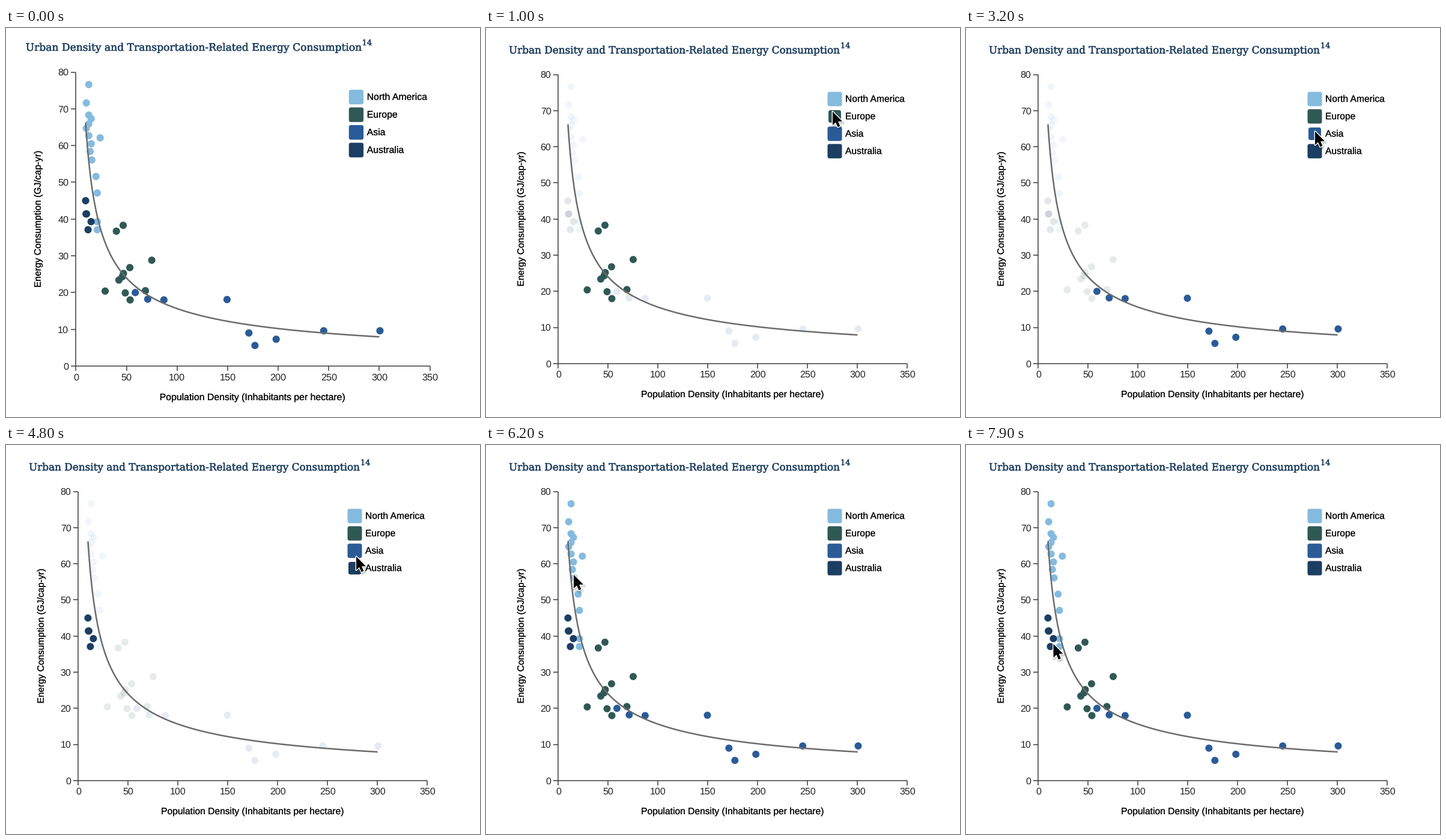
A matplotlib script that plays this animation: 789x649 px, repeating every 8000 ms.

```python
import matplotlib.pyplot as plt
import numpy as np
from matplotlib.animation import FuncAnimation
from matplotlib.patches import Circle, FancyBboxPatch, Polygon, Rectangle
from matplotlib.patheffects import withStroke

W, H, FRAMES = 789, 649, 80
NAVY, INK, AXIS = "#1f4060", "#0c0c0c", "#3a3a3a"
plt.rcParams["text.hinting"] = "none"

# dpi 72 makes one point equal one pixel
fig = plt.figure(figsize=(W / 72, H / 72), dpi=72, facecolor="white")
ax = fig.add_axes([0, 0, 1, 1])
ax.axis("off")

texts = []


def smooth(u):
    u = np.clip(u, 0, 1)
    return u * u * (3 - 2 * u)


def px(density):
    return 120 + 1.66 * density


def py(energy):
    return 559.5 - 6.031 * energy


def label(x, y, s, size, color=INK, stroke=0.2, font="Liberation Sans",
          zoomed=True, **kw):
    t = ax.text(x, y, s, fontsize=size, color=color, family=font, **kw)
    if stroke:
        t.set_path_effects([withStroke(linewidth=stroke, foreground=color)])
    if zoomed:
        texts.append((t, size))
    return t


def rounded(x, y, w, h, r, color, **kw):
    return ax.add_patch(FancyBboxPatch(
        (x, y), w, h, boxstyle=f"round,pad=0,rounding_size={r}",
        fc=color, ec="none", **kw))


# Title and axis names
serif = dict(color=NAVY, stroke=0.5, font="DejaVu Serif")
label(37.5, 42, "Urban Density and Transportation-Related Energy Consumption",
      16.85, **serif)
label(589.5, 33, "14", 12.9, **serif)
label(410, 615.5, "Population Density (Inhabitants per hectare)", 15.6, ha="center")
label(65.5, 318.5, "Energy Consumption (GJ/cap-yr)", 15.4, rotation=90,
      ha="right", va="center")

# Axes
line = dict(color=AXIS, lw=1.5, solid_capstyle="butt")
ax.plot([px(0)] * 2, [py(0), py(80)], **line)
ax.plot([px(0), px(350)], [py(0)] * 2, **line)
for v in range(0, 81, 10):
    ax.plot([px(0) - 8, px(0)], [py(v)] * 2, **line)
    label(px(0) - 12, py(v) + 5.6, str(v), 16, "#222222", 0, ha="right")
for v in range(0, 351, 50):
    ax.plot([px(v)] * 2, [py(0), py(0) + 8], **line)
    label(px(v), py(0) + 23, str(v), 16, "#222222", 0, ha="center")

density = np.linspace(9.6, 300, 600)
ax.plot(px(density), py(66.2 * (density / 9.6) ** -0.616),
        color="#6b6b6b", lw=2.5, zorder=4, solid_capstyle="butt")


def steep_column(energies):
    """A zigzag column of dots that drifts to denser cities at its foot."""
    i = np.arange(len(energies))
    drift = smooth((i - 7) / 4)
    zigzag = 2.4 * np.sin(np.pi * i / 2) * (1 - drift)
    return list(zip(12.7 + 8.4 * drift - zigzag, energies))


# Colour and (density, energy) of the cities in each region
REGIONS = {
    "North America": ("#85bbdf", [(24, 62.1), (20.8, 47.1)] + steep_column(
        [76.6, 71.6, 68.3, 67.3, 65.9, 64.7, 62.7, 60.5, 58.4, 56.1, 51.6,
         47.1, 39.3, 37.1])),
    "Europe": ("#2f5955", [
        (46.7, 38.3), (40, 36.7), (75, 28.8), (53.3, 26.8), (47, 25.2),
        (45.8, 24.3), (42.5, 23.4), (28.9, 20.4), (48.8, 19.9), (68.7, 20.5),
        (53.6, 18)]),
    "Asia": ("#2a5b98", [
        (58.7, 20), (71, 18.2), (87, 18), (149.4, 18.1), (171, 9), (177, 5.6),
        (198, 7.3), (245, 9.6), (300.6, 9.6)]),
    "Australia": ("#1c3e62", [
        (9.6, 45), (10, 41.4), (10.5, 41.4), (15, 39.3), (12, 37.1)]),
}
dots, swatches = {}, {}
for i, (name, (color, cities)) in enumerate(REGIONS.items()):
    mid = 118 + 29 * i
    dots[name] = [ax.add_patch(Circle((px(d), py(e)), 6, fc=color, ec="none",
                                      zorder=3)) for d, e in cities]
    swatches[name] = rounded(568, mid - 12, 24, 24, 3.5, color), mid
    label(597.5, mid + 4.7, name, 15.6)
picked = dots["North America"][1]
picked.set_zorder(3.5)

# Tooltip, as (artist, full opacity) pairs
tip = [(rounded(175 - g, 271 - g, 284 + 2 * g, 100 + 2 * g, 6 + g, "black",
                zorder=5), 0.018) for g in range(1, 6)]
tip.append((rounded(175, 271, 284, 100, 6, "white", zorder=6), 0.92))
head = rounded(175, 271, 284, 50, 6, "#ebe9ea", zorder=6)
head.set_clip_path(Rectangle((175, 271), 284, 38, transform=ax.transData))
tip.append((head, 1))


def tip_text(x, y, s, **kw):
    tip.append((label(x, y, s, 15.3, "#333333", 0, zoomed=False, zorder=7, **kw), 1))


tip_text(185.5, 295.5, "Calgary", weight="bold")
for y, name, value, x, unit in [
        (330.5, "Energy", "47.1", 377.5, "GJ/cap-yr"),
        (361, "Density", "20.8", 287, "Inhabitants per hectare")]:
    tip_text(185.5, y, name)
    tip_text(x, y, value, weight="bold", ha="right")
    tip_text(448, y, unit, ha="right")

# Pointer: soft shadow, white rim, black body
ARROW = 1.42 * np.array([(0, 0), (0, 16), (3.6, 12.6), (6, 18.2),
                         (8.7, 17), (6.4, 11.5), (11.3, 11.5)])
pointer = []
for rim, color, alpha, drop in [(7, "black", 0.05, 2.5), (4.5, "black", 0.1, 2),
                                (2.8, "white", 1, 0), (0, "black", 1, 0)]:
    shape = Polygon(ARROW, fc=color, ec=color if rim else "none", lw=rim,
                    alpha=alpha, zorder=9, joinstyle="round")
    pointer.append((ax.add_patch(shape), np.array([drop / 2, drop])))

# Pointer stops: frame of arrival, frame of leaving, x, y
STOPS = [(5, 5, 648, 90), (9, 23, 576.5, 139), (27, 35, 580.5, 172),
         (39, 45, 583, 200), (48, 48, 582.5, 185.5), (62, 62, 145.5, 216),
         (71, 71, 158, 285.5), (79, 79, 145, 331.5)]
FOCUS = [(7, 25, "Europe"), (25, 37, "Asia"), (37, 49, "Australia")]


def pointer_at(f):
    pos = np.array(STOPS[0][2:], float)
    for (_, leave, *a), (arrive, _, *b) in zip(STOPS, STOPS[1:]):
        pos += smooth((f - leave) / (arrive - leave)) * np.subtract(b, a)
    return pos


def focus(f):
    return next((name for a, b, name in FOCUS if a <= f < b), None)


def opacity(name, f):
    """Average over three frames, so each change of focus is a short fade."""
    return np.mean([1 if focus(f - k) in (None, name) else 0.12 for k in range(3)])


def zoom(f):
    k = 1 - smooth(f / 3)
    sx, sy = 1 + 0.0142 * k, 1 + 0.0165 * k
    left, top = 410 - 410.5 / sx, 318 - 318.5 / sy
    ax.set_xlim(left, left + W / sx)
    ax.set_ylim(top + H / sy, top)
    for t, size in texts:
        t.set_fontsize(size * (sx + sy) / 2)


def draw(f):
    zoom(f)
    for name, circles in dots.items():
        for c in circles:
            c.set_alpha(opacity(name, f))
        box, mid = swatches[name]
        size = 21 if focus(f) == name else 24
        box.set_bounds(580 - size / 2, mid - size / 2, size, size)

    shown = np.interp(f, [67, 69, 71, 73], [0, 1, 1, 0])
    picked.set_facecolor("#f0982a" if shown else REGIONS["North America"][0])
    picked.set_visible(shown > 0)
    for artist, full in tip:
        artist.set_alpha(full * shown)
        artist.set_visible(shown > 0)

    for shape, shift in pointer:
        shape.set_visible(f >= STOPS[0][0])
        shape.set_xy(ARROW + pointer_at(f) + shift)
    return []


anim = FuncAnimation(fig, draw, frames=FRAMES, init_func=lambda: draw(0),
                     interval=100, repeat=True, repeat_delay=0, blit=False)
plt.show()
```
